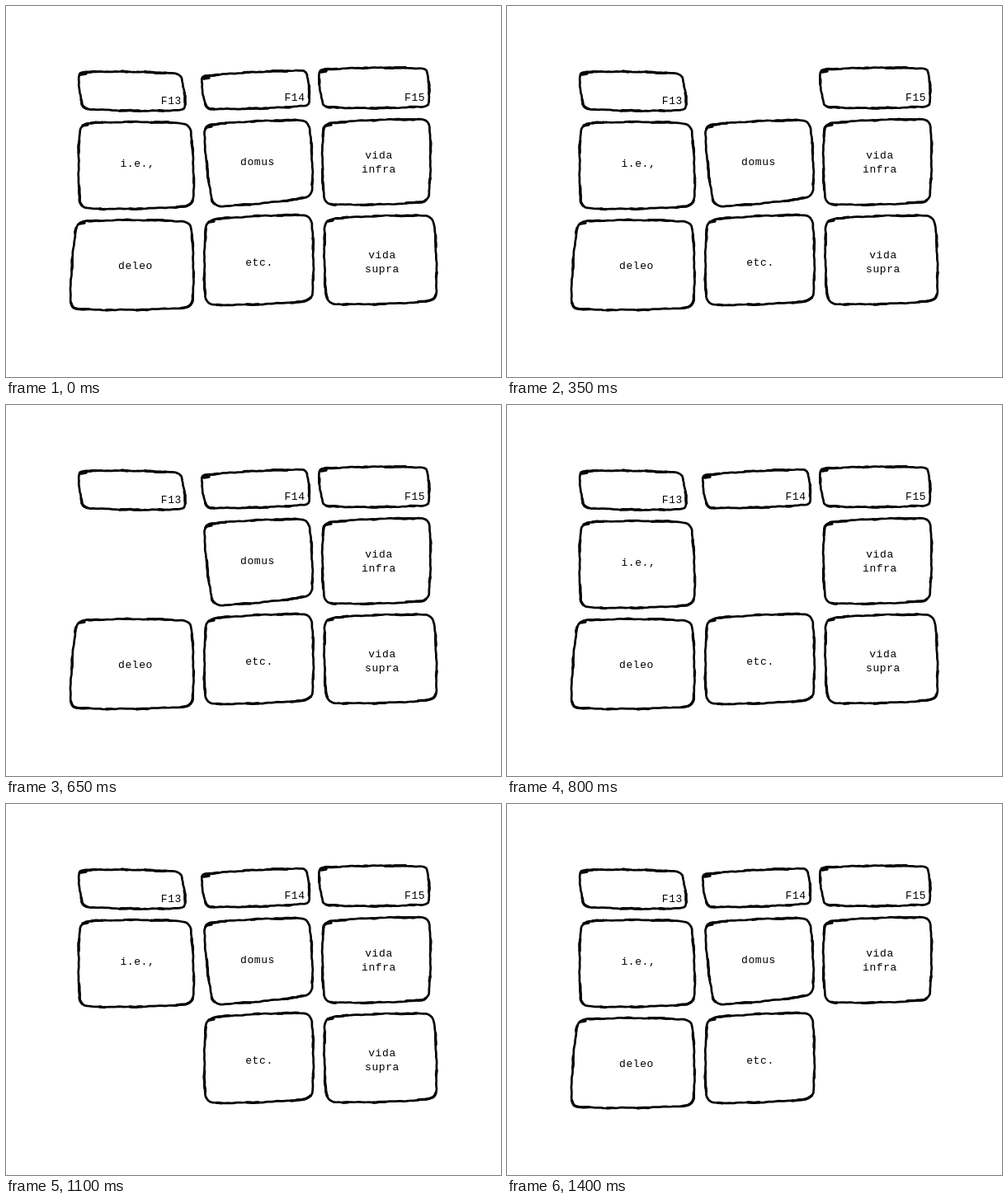
Write an HTML page that moves like this. It is 600 by 450 pixels and loops after 1550 ms.

```html
<!DOCTYPE html>
<html lang="en">
<head>
<meta charset="utf-8">
<title>Blinking keys</title>
<style>
  html, body { margin: 0; width: 100%; height: 100%; overflow: hidden; background: #fff; }
  svg { display: block; width: 600px; height: 450px; }
  path { fill: none; stroke: #080404; stroke-linejoin: round; stroke-linecap: round; }
  text { font: 13px "Liberation Mono", monospace; letter-spacing: 0.6px; text-anchor: middle; fill: #000; }
</style>
</head>
<body>
<svg id="stage" viewBox="0 0 600 450"></svg>
<script>
const LEAD = 200, STEP = 150, LOOP = 1550;
const PEN = 2.7, LINE = 17;

// Label, its middle on the first baseline, and the four corners clockwise
const keys = [
  ["F13", "200.4,119", "87,80 212.5,82 218.5,126.5 92.5,125"],
  ["F14", "350,115", "236,85 365,78 368.5,121 242,125"],
  ["F15", "495.6,115", "378,77 511,75.5 513.5,122 384,123"],
  ["i.e.,", "159.4,195", "89,142 224,142 228,243 89,246"],
  ["domus", "305,193", "239,144 368,138 372,232 250,244"],
  ["vida infra", "452,185", "384,142 514,137 513,238 385,241"],
  ["deleo", "157,319", "85,261 225,261 227,366 77,368"],
  ["etc.", "307,315", "242,259 371,253 372,358 241,363"],
  ["vida supra", "456,306", "386,258 519,254 522,358 388,362"]
];

const stage = document.getElementById("stage");
const point = s => s.split(",").map(Number);

function add(parent, tag, attrs) {
  const el = document.createElementNS("http://www.w3.org/2000/svg", tag);
  for (const name in attrs) el.setAttribute(name, attrs[name]);
  return parent.appendChild(el);
}

// Rounded corners joined by sides that bulge slightly outwards
function outline(corners) {
  const size = Math.hypot(corners[3][0] - corners[0][0], corners[3][1] - corners[0][1]);
  const r = Math.min(14, size * 0.2);
  let d = "";
  corners.forEach((a, i) => {
    const b = corners[(i + 1) % 4];
    const dx = b[0] - a[0], dy = b[1] - a[1], t = r / Math.hypot(dx, dy);
    const at = (along, out) => [a[0] + dx * along + dy * out, a[1] + dy * along - dx * out];
    d += i ? `Q${a} ${at(t, 0)}` : `M${at(t, 0)}`;
    d += `Q${at(0.5, 0.02)} ${at(1 - t, 0)}`;
    if (i === 3) d += `Q${b} ${d.slice(1, d.indexOf("Q"))}Z`;
  });
  return d;
}

// Gives a clean outline the unsteady edge of a pen line
function wobble(path, seed) {
  const len = path.getTotalLength(), n = Math.round(len / 3);
  const wave = (k, turns) => Math.sin(k / n * turns * 2 * Math.PI + seed * turns);
  let d = "";
  for (let k = 0; k < n; k++) {
    const q = path.getPointAtLength(k / n * len);
    const x = q.x + 0.3 * wave(k, 13) + 0.2 * wave(k, 41);
    const y = q.y + 0.3 * wave(k, 11) + 0.2 * wave(k, 37);
    d += (k ? "L" : "M") + x.toFixed(2) + "," + y.toFixed(2);
  }
  return d + "Z";
}

const groups = keys.map(([label, middle, quad], i) => {
  const g = add(stage, "g", {});
  const corners = quad.split(" ").map(point);
  const line = add(g, "path", { d: outline(corners), "stroke-width": PEN });
  const d = wobble(line, i + 1.3);
  line.setAttribute("d", d);
  add(g, "path", { d, "stroke-width": PEN + 0.6, "stroke-dasharray": "14 31 6 22 25 40" });

  // Pen blot where the line begins
  const [cx, cy] = corners[0];
  add(g, "path", { d: `M${cx + 4},${cy + 3}l6,-1`, "stroke-width": PEN + 0.8 });

  const [x, y] = point(middle);
  label.split(" ").forEach((word, row) => {
    add(g, "text", { x, y: y + row * LINE }).textContent = word;
  });
  return g;
});

let start;
function draw(now) {
  start ??= now;
  const gone = Math.floor(((now - start) % LOOP - LEAD) / STEP);
  groups.forEach((g, i) => g.style.visibility = i === gone ? "hidden" : "visible");
  requestAnimationFrame(draw);
}
requestAnimationFrame(draw);
</script>
</body>
</html>
```
